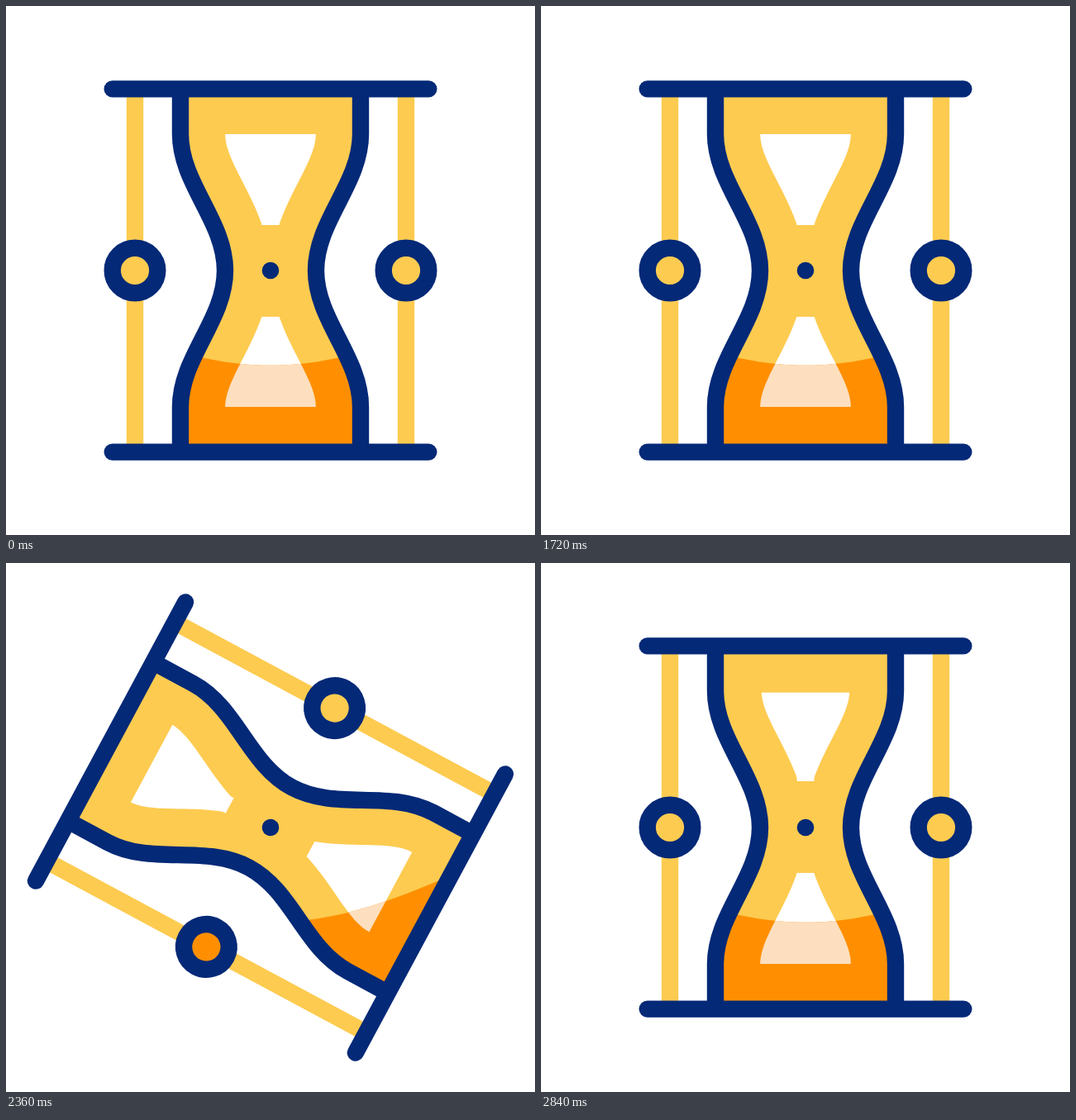
An HTML page with a canvas that plays this animation: 640x640 px, repeating every 3000 ms.

```html
<!DOCTYPE html>
<html lang="en">
<head>
<meta charset="utf-8">
<title>Hourglass</title>
<style>
html, body { margin: 0; width: 100%; height: 100%; overflow: hidden; background: #fff; }
canvas { display: block; width: 640px; height: 640px; }
</style>
</head>
<body>
<canvas id="stage" width="640" height="640"></canvas>
<script>
const ctx = document.getElementById('stage').getContext('2d');
const LOOP = 3000, STEP = 40, LINE = 20.4;
const NAVY = '#042977', YELLOW = '#fdcb50', ORANGE = '#ff8f00', TINT = '#fddfbf';

const clamp = v => Math.min(1, Math.max(0, v));
const span = (t, from, to) => clamp((t - from) / (to - from));
const smooth = u => u * u * (3 - 2 * u);
const mix = (a, b, u) => a + (b - a) * u;

// Cubic timing curve with handles (x1, 0) and (x2, 1).
function swing(u, x1, x2) {
  let lo = 0, hi = 1;
  for (let i = 0; i < 24; i++) {
    const s = (lo + hi) / 2, r = 1 - s;
    if (3 * r * r * s * x1 + 3 * r * s * s * x2 + s * s * s < u) lo = s; else hi = s;
  }
  return smooth(lo);
}

// The figure is drawn around (0, 0); the glass wall runs from the shoulder to the waist.
const SHOULDER = { x: -109, y: -165 }, WAIST = -55, BEND = 60;

// Point on the wall, moved inwards by `inset`.
function wallPoint(s, inset) {
  const r = 1 - s, rest = 165 - 2 * BEND, run = WAIST - SHOULDER.x;
  const x = SHOULDER.x + run * smooth(s);
  const y = SHOULDER.y + 3 * s * r * r * BEND + 3 * s * s * r * (165 - BEND) + s * s * s * 165;
  const dx = run * 6 * s * r;
  const dy = 3 * (r * r * BEND + 2 * s * r * rest + s * s * BEND);
  const len = Math.hypot(dx, dy);
  return [x + inset * dy / len, y - inset * dx / len];
}

function wall(side) {
  const { x, y } = SHOULDER;
  ctx.moveTo(side * x, -220);
  ctx.lineTo(side * x, y);
  ctx.bezierCurveTo(side * x, y + BEND, side * WAIST, -BEND, side * WAIST, 0);
  ctx.bezierCurveTo(side * WAIST, BEND, side * x, -y - BEND, side * x, -y);
  ctx.lineTo(side * x, 220);
}

function glass() {
  ctx.beginPath();
  wall(1);
  ctx.lineTo(-SHOULDER.x, 220);
  const { x, y } = SHOULDER;
  ctx.lineTo(-x, -y);
  ctx.bezierCurveTo(-x, -y - BEND, -WAIST, BEND, -WAIST, 0);
  ctx.bezierCurveTo(-WAIST, -BEND, -x, y + BEND, -x, y);
  ctx.lineTo(-x, -220);
  ctx.closePath();
  ctx.fill();
}

// One half of the inner shape; dir is -1 for the top, 1 for the bottom.
function funnel(dir, inset) {
  const edge = [];
  for (let i = 0; i <= 32; i++) edge.push(wallPoint(i / 40, inset));
  ctx.beginPath();
  edge.forEach(([x, y]) => ctx.lineTo(x, -dir * y));
  edge.reverse().forEach(([x, y]) => ctx.lineTo(-x, -dir * y));
  ctx.closePath();
  ctx.fill();
}

function ring(x) {
  ctx.beginPath();
  ctx.arc(x, 0, 27.3, 0, 7);
}

function line(x1, y1, x2, y2) {
  ctx.beginPath();
  ctx.moveTo(x1, y1);
  ctx.lineTo(x2, y2);
  ctx.stroke();
}

// Distances from the centre between which the inner shape is hidden.
function gapAt(t) {
  if (t < 600) return [55 * smooth(t / 600), 55];
  if (t < 1280) {
    const outer = mix(185, 55, smooth(span(t, 600, 1170)));
    return [outer - 20.3, outer];
  }
  return [mix(34.7, 0, smooth(span(t, 1280, 1720))), 55];
}

function fills(base, inner, gap, turning) {
  ctx.fillStyle = base;
  glass();
  for (const x of [-164, 164]) { ring(x); ctx.fill(); }
  ctx.fillStyle = inner;
  funnel(-1, 54.2);
  funnel(1, turning ? 55.8 : 54.2);
  ctx.fillRect(-10.4, -66, 20.8, 132);
  ctx.fillStyle = base;
  const [near, far] = gap, size = far - near;
  if (size > 0.05) {
    ctx.fillRect(-58, -far, 116, size);
    ctx.fillRect(-58, near ? near + 1 : 0, 116, near ? size : far + 1);
  }
  if (turning) ctx.fillRect(-58, 163.3, 116, 4);
}

// The liquid surface stays level while the glass turns.
function clipLiquid() {
  ctx.beginPath();
  for (let x = 0; x <= 640; x += 8) {
    ctx.lineTo(x, 434.8 - 68 * (1 - Math.cos(0.00645 * (x - 320))));
  }
  ctx.lineTo(640, 640);
  ctx.lineTo(0, 640);
  ctx.closePath();
  ctx.clip();
}

function draw(t) {
  const angle = Math.PI * swing(span(t, 2000, 2800), 0.333, 0.307);
  const gap = gapAt(t), turning = t > 2000;
  const pose = () => { ctx.translate(320, 320); ctx.rotate(angle); };

  ctx.fillStyle = '#fff';
  ctx.fillRect(0, 0, 640, 640);
  ctx.lineWidth = LINE;

  ctx.save();
  pose();
  ctx.lineCap = 'butt';
  ctx.strokeStyle = YELLOW;
  for (const x of [-164, 164]) line(x, -215, x, 215);
  fills(YELLOW, '#fff', gap, turning);
  ctx.restore();

  ctx.save();
  clipLiquid();
  pose();
  fills(ORANGE, TINT, gap, turning);
  ctx.restore();

  ctx.save();
  pose();
  ctx.strokeStyle = ctx.fillStyle = NAVY;
  for (const side of [-1, 1]) {
    ctx.beginPath();
    wall(side);
    ctx.stroke();
    ring(164 * side);
    ctx.stroke();
  }
  ctx.lineCap = 'round';
  for (const y of [-219.6, 219.6]) line(-191.3, y, 191.3, y);
  ctx.beginPath();
  ctx.arc(0, 0, 10.3, 0, 7);
  ctx.fill();
  ctx.restore();
}

const start = performance.now();
function tick() {
  const t = (performance.now() - start) % LOOP;
  draw(Math.floor(t / STEP) * STEP);
  requestAnimationFrame(tick);
}
tick();
</script>
</body>
</html>
```
